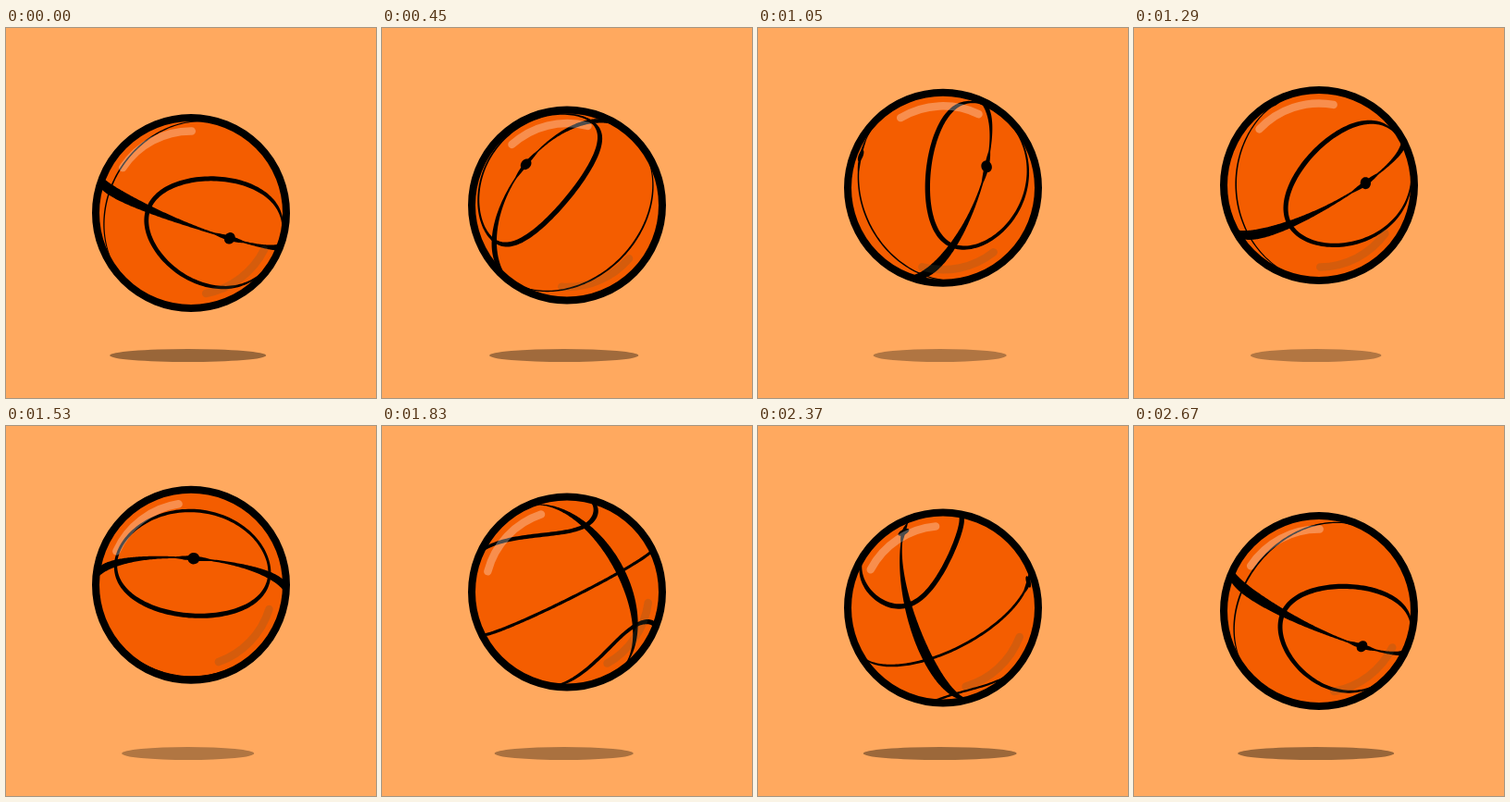
Write an HTML page with a canvas that moves like this. It is 400x400 px and loops after 2.7 s.

```html
<!DOCTYPE html>
<html lang="en">
<head>
<meta charset="utf-8">
<title>Spinning basketball</title>
<style>
  html, body { margin: 0; width: 100%; height: 100%; overflow: hidden; background: #ffa95f; }
  canvas { display: block; width: 400px; height: 400px; }
</style>
</head>
<body>
<canvas id="stage" width="400" height="400"></canvas>
<script>
const ctx = document.getElementById('stage').getContext('2d');
const LOOP = 2700, STEP = 30, R = 103, TAU = Math.PI * 2, RAD = Math.PI / 180;
const { sin, cos, abs, hypot } = Math;

const cross = (a, b) => [
  a[1] * b[2] - a[2] * b[1],
  a[2] * b[0] - a[0] * b[2],
  a[0] * b[1] - a[1] * b[0]
];
const unit = v => { const l = hypot(...v); return v.map(c => c / l); };
const ease = p => (1 - cos(Math.PI * p)) / 2;

// Ball axes: loop centre, long direction of the loop, valve
function orientation(turn) {
  const a = 172.3 * RAD + turn, b = 19.8 * RAD - turn, c = -64.4 * RAD - turn;
  const valve = [sin(b), cos(b) * cos(a), cos(b) * sin(a)];
  const e1 = [cos(b), -sin(b) * cos(a), -sin(b) * sin(a)];
  const e2 = [0, -sin(a), cos(a)];
  const hub = e1.map((v, i) => cos(c) * v + sin(c) * e2[i]);
  return [hub, cross(valve, hub), valve];
}

// Closed seam on the sphere: curve(s) in ball axes, width(s) in pixels
function seam(axes, curve, width, steps = 160) {
  const at = s => {
    const p = unit(curve(s));
    return [0, 1, 2].map(i => axes.reduce((sum, axis, j) => sum + axis[i] * p[j], 0));
  };
  const edge = s => {
    const p = at(s), q = at(s + 0.001);
    const side = unit(cross(p, q.map((v, i) => v - p[i])));
    const h = width(s) / 2;
    return { z: p[2], l: [0, 1].map(i => p[i] * R + side[i] * h), r: [0, 1].map(i => p[i] * R - side[i] * h) };
  };
  ctx.beginPath();
  let last = edge(0);
  for (let i = 1; i <= steps; i++) {
    const next = edge(i / steps * TAU);
    if (last.z > 0 && next.z > 0) {
      ctx.moveTo(...last.l);
      ctx.lineTo(...next.l);
      ctx.lineTo(...next.r);
      ctx.lineTo(...last.r);
      ctx.closePath();
    }
    last = next;
  }
  ctx.fill();
}

// Spindle-shaped swelling of a seam around a knot
const swell = d => 3.6 * Math.max(0, 1 - (d / 0.18) ** 2);

function drawSeams(axes) {
  const la = sin(54 * RAD), lb = sin(35 * RAD);
  ctx.fillStyle = '#000';
  seam(axes, s => [cos(s), sin(s), 0],
    s => 1.6 + 10 * sin(s) ** 2 + swell(abs(sin(s))), 360);
  seam(axes, s => [0, sin(s), cos(s)],
    s => 3.2 + (cos(s) > 0 ? swell(abs(sin(s))) : 0), 240);
  for (const side of [1, -1]) {
    seam(axes, s => {
      const u = la * cos(s), v = lb * sin(s);
      return [side * Math.sqrt(1 - u * u - v * v), u, v];
    }, () => 5.4);
  }
  const k = 4 / R;
  const knots = [
    s => [1, k * cos(s), k * sin(s)],
    s => [-1, k * cos(s), k * sin(s)],
    s => [k * cos(s), k * sin(s), 1]
  ];
  for (const knot of knots) seam(axes, knot, () => 5, 32);
}

function gloss(mid, span, color) {
  ctx.beginPath();
  ctx.arc(0, 0, 88.5, (mid - span / 2) * RAD, (mid + span / 2) * RAD);
  ctx.strokeStyle = color;
  ctx.lineWidth = 8.5;
  ctx.stroke();
}

function sway(t) {
  const keys = [-28, 0.5, -47, -28];
  const i = Math.floor(t / 900), p = ease(t / 900 - i);
  return keys[i] + (keys[i + 1] - keys[i]) * p;
}

function draw(t) {
  const lift = 15 * (1 - cos((t + 33) / LOOP * TAU));
  ctx.fillStyle = '#ffa95f';
  ctx.fillRect(0, 0, 400, 400);

  ctx.fillStyle = `rgba(0,0,0,${0.4 - lift / 300})`;
  ctx.beginPath();
  ctx.ellipse(196.7, 354, 84.5 - 0.46 * lift, 7, 0, 0, TAU);
  ctx.fill();

  ctx.save();
  ctx.translate(200, 200 - lift);
  ctx.fillStyle = '#f45d00';
  ctx.beginPath();
  ctx.arc(0, 0, R, 0, TAU);
  ctx.fill();
  drawSeams(orientation(t / LOOP * TAU));

  ctx.lineCap = 'round';
  const tilt = sway(t);
  gloss(tilt - 90, 57, 'rgba(255,255,255,0.3)');
  gloss(tilt + 81, 53, 'rgba(90,90,60,0.2)');

  ctx.beginPath();
  ctx.arc(0, 0, R, 0, TAU);
  ctx.strokeStyle = '#000';
  ctx.lineWidth = 8;
  ctx.stroke();
  ctx.restore();
}

const start = performance.now();
function frame() {
  const t = (performance.now() - start) % LOOP;
  draw(Math.floor(t / STEP) * STEP);
  requestAnimationFrame(frame);
}
frame();
</script>
</body>
</html>
```
